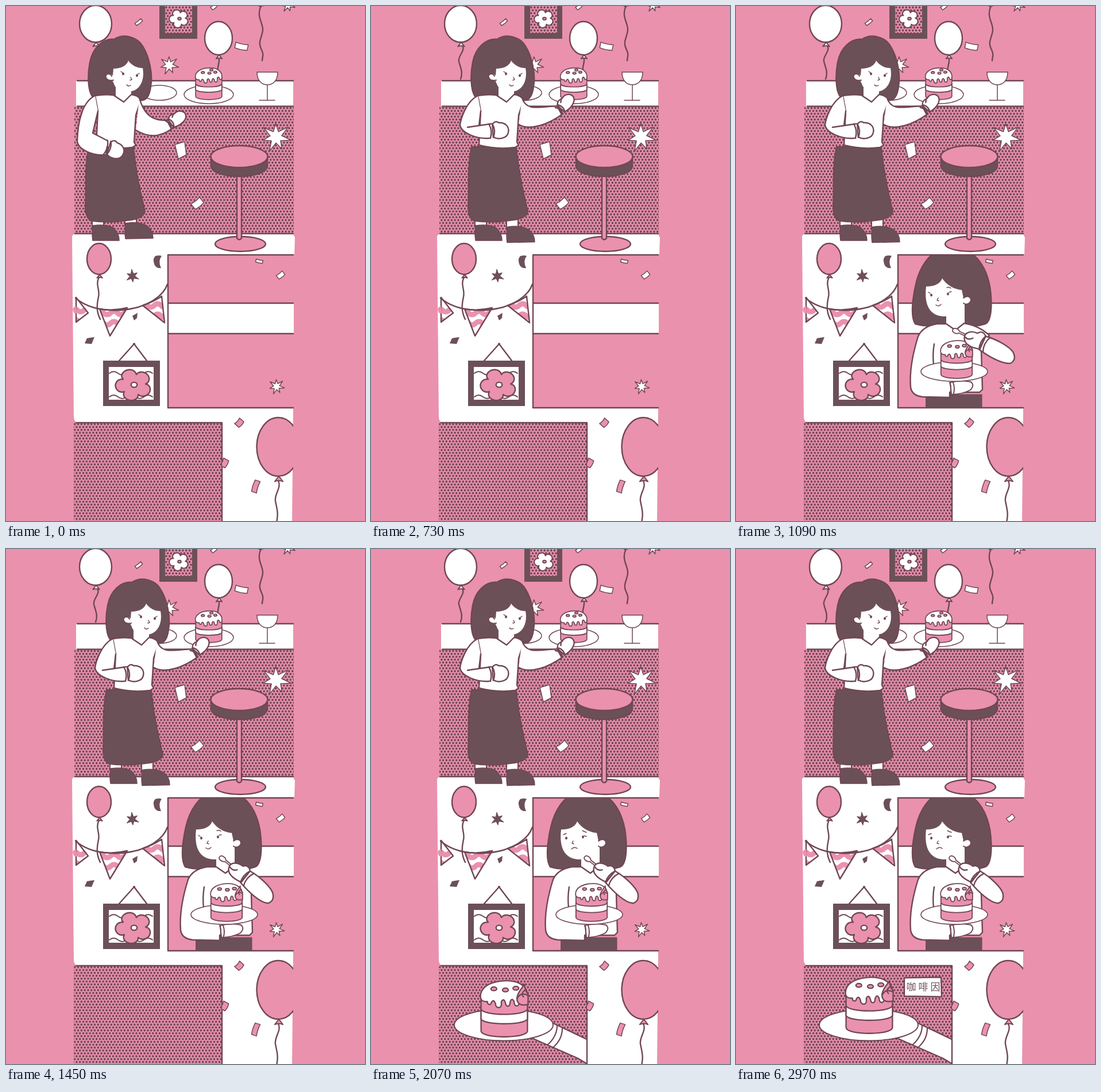
These frames come from a looping animation (625x896 px, 3.08 s). An HTML page:

```html
<!DOCTYPE html>
<html lang="zh">
<head>
<meta charset="utf-8">
<title>Party comic</title>
<style>
  html, body { margin: 0; width: 100%; height: 100%; overflow: hidden; background: #ea91ae; }
  svg { display: block; width: 100%; height: 100%; }
  path, ellipse, rect { stroke-linecap: round; stroke-linejoin: round; vector-effect: non-scaling-stroke; }
  text { font: 500 17px "Noto Sans CJK SC", "Noto Sans CJK", sans-serif; text-anchor: middle; fill: #6c5058; }
</style>
</head>
<body>
<svg id="stage" viewBox="0 0 625 896"></svg>
<script>
const PINK = '#ea91ae', DARK = '#6c5058', LINE = '#704655', WHITE = '#fff', DOTS = 'url(#dots)';
const LOOP = 3080;

const path = (d, fill = 'none', w = 2.4, extra = '') =>
  `<path d="${d}" fill="${fill}" stroke="${LINE}" stroke-width="${w}" ${extra}/>`;
const flat = (d, fill, extra = '') => `<path d="${d}" fill="${fill}" ${extra}/>`;
const oval = (x, y, rx, ry, fill, w = 2.4) =>
  `<ellipse cx="${x}" cy="${y}" rx="${rx}" ry="${ry}" fill="${fill}" stroke="${LINE}" stroke-width="${w}"/>`;
const box = (x, y, w, h, fill) => `<rect x="${x}" y="${y}" width="${w}" height="${h}" fill="${fill}"/>`;
const group = (id, body) => `<g id="${id}">${body}</g>`;
const eye = (x, y) => oval(x, y, 1.5, 2.1, LINE, 1);

const polar = (x, y, count, radius, squash = 1) => 'M' + Array.from({ length: count }, (_, i) => {
  const a = i / count * 2 * Math.PI, r = radius(a, i);
  return `${(x + r * Math.cos(a)).toFixed(1)} ${(y + r * squash * Math.sin(a)).toFixed(1)}`;
}).join('L') + 'z';
const star = (x, y, r, points, fill, w = 1.6, turn = 0) =>
  path(polar(x, y, points * 2, (a, i) => i % 2 ? r * .38 : r * (i % 4 ? .86 : 1)), fill, w,
    `transform="rotate(${turn} ${x} ${y})"`);
const flower = (x, y, r, fill, w, squash) =>
  path(polar(x, y, 80, a => r * (.62 + .4 * Math.sqrt(Math.abs(Math.sin(2.5 * a + .22)))), squash), fill, w) +
  oval(x + 1, y, r * .17, r * .14, fill === WHITE ? PINK : WHITE, w);
const ribbon = (x, y, w, h, turn, fill) =>
  path(`M${-w / 2} ${-h / 2}Q0 ${-h * .3} ${w / 2} ${-h / 2}V${h / 2}Q0 ${h * .7} ${-w / 2} ${h / 2}z`,
    fill, 1.5, `transform="translate(${x} ${y}) rotate(${turn})"`);
const balloon = (x, y, rx, ry, fill, string) => {
  const b = y + ry, k = rx * .15 + 1.5;
  return path(string) + oval(x, y, rx, ry, fill) +
    path(`M${x + 1} ${b}l${-k} ${k * 1.3}q${k} ${-k * .4} ${k * 2} 0z`, fill, 2);
};
const wave = (x, y, step, n) => `M${x} ${y}q${step / 2} -6 ${step} 0` + `t${step} 0`.repeat(n);

// Cake around its bottom centre; 80 units wide.
const cake = (x, y, scale, w, bitten) => `<g transform="translate(${x} ${y}) scale(${scale})">` +
  path('M-40 -68V-10C-38 3 38 3 40 -10V-68z', PINK, w) +
  path('M-40 -48C-36 -36 36 -36 40 -48V-31C36 -20 -36 -20 -40 -31z', WHITE, w) +
  path(`M-41 -70C-41 -88 -19 -97 4 -97C28 -97 41 -85 40 -69C40 -59 33 -59 32 -67Q29 -72 26 -66V-59
    C25 -51 17 -52 17 -61Q13 -69 10 -60C10 -51 3 -51 2 -59Q-1 -68 -5 -61V-55C-7 -48 -15 -50 -15 -57
    Q-18 -66 -22 -60C-23 -54 -29 -55 -29 -61Q-41 -60 -41 -70z`, WHITE, w) +
  [[-18, -83], [2, -81], [20, -84], [8, -91]].slice(0, bitten ? 3 : 4)
    .map(([bx, by]) => oval(bx, by, 5, 3.2, PINK, w)).join('') +
  (bitten ? path('M35 -91C31 -84 24 -79 22 -68C21 -57 29 -53 41 -56V-74Q35 -80 35 -91z', PINK, w) +
    path('M35 -80Q28 -75 33 -69M22 -66Q28 -78 40 -72', 'none', w) : '') + '</g>';

const flag = (id, d, x, y) => `<clipPath id="${id}"><path d="${d}"/></clipPath>` + flat(d, WHITE) +
  `<g clip-path="url(#${id})" fill="none" stroke="${PINK}" stroke-width="9">` +
  [0, 18].map(dy => `<path d="${wave(x, y + dy, 12, 5)}"/>`).join('') + '</g>' + path(d);

const wall =
  balloon(156, 31, 28, 32, WHITE, 'M158 67C166 78 151 86 153 96S161 115 156 127') +
  balloon(370, 56, 24, 29, WHITE, 'M370 88C374 97 367 104 369 114') +
  path('M444 0C435 18 448 30 447 42S438 62 444 74S446 88 446 95') + path('M438 -2l4 3 7 -2', WHITE, 2) +
  box(267, 0, 66, 57, DARK) + box(277, 0, 47, 47, DOTS) + flower(301, 22, 16.5, WHITE, 2, .95) +
  ribbon(231, 28, 13, 5, -38, WHITE) + ribbon(410, 70, 22, 10, 12, WHITE) + ribbon(362, 1, 11, 6, -40, WHITE) +
  star(491, -2, 13, 7, WHITE, 1.5, 20) + star(284, 103, 17, 7, WHITE, 1.5, 12) +
  box(122, 130, 378, 45, WHITE) + box(119, 175, 382, 221, DOTS) +
  path('M124 130H500M124 174.5H500') +
  oval(267, 151, 30, 13, WHITE, 1.5) + oval(353, 154, 43, 16, WHITE, 1.5) + cake(353, 163, .57, 1.7, false) +
  path('M437 115H473C473 131 464 137 455 137S437 131 437 115zM455 137V164M441 164H468', WHITE, 1.5) +
  star(470, 228, 27, 7, WHITE, 1.5, 12) +
  path('M294 241L311 236 314 259 300 266z', WHITE, 1.5) + ribbon(333, 343, 19, 12, -38, WHITE);

const floor =
  flat('M119 397H500L503 403 502 432H283V699H500L498 896H376V725H124Q118 723 118 714L115 402Q115 398 119 397z', WHITE) +
  path('M120 396H500') +
  oval(408, 414, 44, 13, PINK) + path('M402 290V404Q406 409 410 404V290z', PINK) +
  path('M357 262V280C362 302 450 302 455 280V262z', DARK) + oval(406, 262, 49.5, 19, PINK);

const leftRoom =
  flag('flagA', 'M122 507L143 534 122 550z', 112, 529) + flat('M122 522Q114 525 117 531 119 537 124 534z', PINK) +
  flag('flagB', 'M163 527L181 574 211 525Q187 531 163 527z', 158, 534) +
  flag('flagC', 'M238 521L276 551 271 505Q256 515 238 521z', 234, 521) +
  path('M121 508C148 531 192 534 230 524Q272 510 281 484') +
  balloon(162, 440, 21, 27, PINK, 'M162 472C155 485 164 493 161 506S157 531 164 545') +
  flat('M260 435Q267 433 271 435Q264 443 270 456Q261 457 258 449Q255 439 260 435z', DARK) +
  star(220, 470, 12, 6, DARK, 1, 25) +
  flat('M220 539L229 534 228 543 223 547z', DARK) + flat('M141 578L154 576 149 588 137 587z', DARK) +
  path('M197 617L223 588 245 617') + oval(223, 588, 1.6, 1.6, LINE, 1) +
  box(169, 617, 99, 79, DARK) + box(179, 628, 78, 57, WHITE) +
  path(wave(180, 639, 15, 4) + wave(180, 680, 15, 4), 'none', 2) +
  flower(222, 659, 31, PINK, 2.4, .87);

const rightRoom = box(282, 433, 218, 266, PINK) + box(282, 517, 219, 53, WHITE) +
  path('M282 517H500M282 570H500');
const rightConfetti = ribbon(441, 444, 12, 5, 12, WHITE) + ribbon(478, 468, 13, 8, -38, WHITE) +
  star(471, 662, 14, 7, WHITE, 1.5, 10);

const corner = `<g clip-path="url(#cornerClip)">` +
  balloon(474, 767, 37.5, 51, PINK, 'M474 826C480 838 467 849 469 861S475 882 471 898') +
  ribbon(406, 725, 13, 10, -48, PINK) + ribbon(380, 795, 14, 10, -62, PINK) + ribbon(435, 836, 21, 9, 108, PINK) + '</g>';

const guestBody =
  path('M150 368V385H170V368z', WHITE, 2) +
  path('M151 382Q174 379 187 386Q197 395 197 408H151Q149 394 151 382z', DARK, 1.5) +
  group('foot', path('M207 362V382H227V362z', WHITE, 2) +
    path('M208 378Q232 374 246 383Q256 391 256 404L208 405Q206 391 208 378z', DARK, 1.5)) +
  path('M144 245H222C226 290 234 325 242 357Q241 368 220 372Q180 378 149 374Q139 370 138 352C140 314 136 280 144 245z', DARK, 2) +
  path(`M150 157C142 145 142 119 146 98C151 72 170 56 188 58C205 47 229 54 238 70
    C249 88 256 117 252 140C250 156 245 165 234 164L212 152 184 157z`, DARK) +
  flat('M191 130V157L205 167 218 154V143z', WHITE) +
  flat(`M185 129C173 132 170 119 178 118Q183 118 186 121L187 109C200 109 210 104 213 95
    C219 104 229 108 238 108C242 129 233 148 214 149Q200 149 190 140z`, WHITE) +
  path('M187 129C173 132 170 119 178 118Q182 118 184 122', WHITE, 2) +
  eye(204, 118) + eye(228, 121) +
  path('M217 124l2 4 -3 1M210 137Q213 141 217 138M203 116l-3 -2M229 119l3 -2', 'none', 1.4) +
  path('M155 156Q172 153 187 155L205 167 218 154Q229 155 235 163L226 190 223 237 226 242 220 246Q188 250 157 242L160 183z', WHITE);

const guest = group('guest', guestBody + path('', WHITE, 2.4, 'id="reach"') +
  group('reachHand', path('M2 -8C6 -15 13 -14 16 -13C25 -17 35 -10 33 -2C31 7 16 10 5 8z', WHITE) +
    path('M-3 -8Q4 0 0 9M4 -8Q10 0 5 9M14 -13L10 -9')) +
  flat('', WHITE, 'id="sleeve"') + path('', 'none', 2.4, 'id="sleeveLines"') +
  group('foldHand', path('M3 -11Q9 -18 14 -13C26 -13 32 -5 30 4C28 16 11 17 3 11z', WHITE) +
    path('M-3 -12Q3 0 -2 13M3 -12Q9 0 3 12')));

const taster =
  path('M331 676H428V702H331z', DARK, 1) +
  path(`M312 553C303 540 308 506 313 484C320 453 337 431 353 426H403C425 438 437 462 442 488
    C446 514 446 548 434 553Q414 560 397 552L366 553Q335 560 312 553z`, DARK) +
  flat('M366 530V553L382 564 398 553V515z', WHITE) +
  flat(`M331 488C345 488 355 484 359 474C368 487 381 493 393 494Q395 503 396 508
    C406 501 412 510 407 516Q401 521 395 517C390 532 375 541 360 540C338 538 327 521 331 488z`, WHITE) +
  path('M396 508C406 501 412 510 407 516Q401 521 396 517', WHITE, 2) +
  path(`M350 553Q325 557 317 575C307 607 302 638 304 663Q306 678 325 680L372 681V672H424L429 667
    427 600 441 573Q423 556 397 552L382 564 366 553z`, WHITE) +
  path('M345 588Q342 606 344 624') +
  path('M373 655Q392 650 409 654Q416 660 408 668Q396 675 375 676z', WHITE, 2) +
  path('M372 655Q376 666 372 680M378 655Q382 666 378 677', 'none', 2) +
  oval(380, 636, 58, 17, WHITE, 1.6) + cake(384, 648, .68, 1.8, true) +
  eye(340, 503) + eye(369, 501) +
  path('M352 508l-2 4 3 1', 'none', 1.4) +
  group('smile', path('M348 520Q353 524 357 519M338 500l-3 -2M371 498l4 -1M367 490q4 -2 7 1', 'none', 1.4)) +
  group('frown', path('M349 522Q354 517 359 521M335 497l5 -2M368 490l7 3M371 499l4 1', 'none', 1.4)) +
  group('spoonArm',
    path('M-4 -13C18 -16 42 -13 51 -7Q62 2 55 12C44 20 15 17 -4 13z', WHITE) +
    path('M-34 -2H-49C-52 -6 -61 -5 -61 0S-52 5 -49 1H-34z', WHITE, 1.8) +
    path('M-4 -13C-10 -19 -16 -17 -19 -12C-32 -12 -40 -4 -37 4C-33 16 -18 15 -5 12z', WHITE) +
    path('M-4 -13Q-10 0 -5 13M4 -14Q-3 0 3 14M-36 3Q-28 6 -23 -1'));

const serving =
  path('M278 850L317 825 380 855V898L360 886z', WHITE) +
  path('M324 829Q324 848 307 863M333 834Q333 854 316 868', 'none', 2.2) +
  oval(231, 828, 86, 27.5, WHITE, 2) + group('servedCake', cake(232, 849, 1.01, 2.3, true));

const label = group('label', path('M293 746L357 745 358 779 293 778z', WHITE)) +
  [...'咖啡因'].map((c, i) => `<text id="char${i}" x="${305 + 21 * i}" y="768">${c}</text>`).join('');

const clip = (id, x, y, w, h) => `<clipPath id="${id}">${box(x, y, w, h, WHITE)}</clipPath>`;
document.getElementById('stage').innerHTML = `<defs>
  <pattern id="dots" width="5.78" height="10" patternUnits="userSpaceOnUse">
    <rect width="5.78" height="10" fill="${PINK}"/>
    <path d="M1.445 2.5h0M4.335 7.5h0" stroke="${LINE}" stroke-width="4" stroke-linecap="round"/>
  </pattern>` + clip('roomClip', 282, 433, 218, 266) + clip('serveClip', 118, 725, 258, 171) +
  clip('cornerClip', 376, 701, 124, 195) + '</defs>' +
  box(0, 0, 625, 896, PINK) + wall + floor + leftRoom + rightRoom +
  `<g clip-path="url(#roomClip)">${group('taster', taster)}</g>` + rightConfetti +
  path('M500 433H282V699H500') + box(118, 725, 258, 171, DOTS) +
  `<g clip-path="url(#serveClip)">${group('serving', serving)}</g>` + label +
  path('M122 725H376V898') + corner + guest;

const ticks = [0, 110, 200, 290, 390, 470, 570, 650, 730, 830, 910, 1010, 1090, 1190, 1290, 1370, 1450, 1550,
  1630, 1710, 1810, 1890, 1990, 2070, 2170, 2250, 2350, 2450, 2530, 2610, 2710, 2790, 2870, 2970];
const tracks = {
  walk: [[0, 0, 0], [200, 8, 4], [390, 22, 5], [570, 29, -3], [730, 31, 0]],
  foot: [[0, 0, 0], [390, -4, 1], [730, -2, 6.5]],
  reach: [[0, 284, 206, -25, 216], [390, 295, 190, -33, 206], [730, 297, 181, -38, 206]],
  fold: [[0, 176, 246, 18, 151, 221, 151], [390, 183, 229, 2, 153, 217, 153], [730, 178, 217, -4, 137, 211, 157]],
  taster: [[830, 180], [910, 80], [1010, 20], [1090, 0]],
  spoon: [[1090, 433, 588, 24], [1450, 420, 573, 38]],
  serving: [[1810, 170, 60], [1890, 80, 28], [1990, 20, 7], [2070, 0, 0]],
  cake: [[2070, 0], [2350, -6]],
};

// Linear value between the two neighbouring steps of a track.
function at(name, t) {
  const track = tracks[name], next = track.findIndex(s => s[0] > t);
  if (next === 0) return track[0].slice(1);
  if (next < 0) return track.at(-1).slice(1);
  const a = track[next - 1], b = track[next], k = (t - a[0]) / (b[0] - a[0]);
  return a.slice(1).map((v, i) => v + (b[i + 1] - v) * k);
}
const el = id => document.getElementById(id);
const move = (id, x, y, turn = 0) => el(id).setAttribute('transform', `translate(${x} ${y}) rotate(${turn})`);
const show = (id, on) => el(id).setAttribute('visibility', on ? 'visible' : 'hidden');
const shape = (id, d) => el(id).setAttribute('d', d);

function pose(t) {
  move('guest', ...at('walk', t));
  move('foot', ...at('foot', t));
  const [rx, ry, rTurn, under] = at('reach', t);
  shape('reach', `M232 160C239 184 ${rx - 34} ${ry - 6} ${rx - 4} ${ry - 7}L${rx + 4} ${ry + 8}
    C${rx - 18} ${ry + 24} 246 ${under + 12} 226 ${under}`);
  move('reachHand', rx, ry, rTurn);

  // Folded arm: outer edge, upper forearm edge, and the body line that meets the forearm.
  const [fx, fy, fTurn, ex, ey, bodyX] = at('fold', t);
  const bodyY = ey + (fy - 12 - ey) * (bodyX - ex) / (fx - ex);
  const outer = `L${fx - 3} ${fy + 13}C${fx - 24} ${fy + 15} 126 ${fy + 4} 124 ${fy - 10}C125 198 134 166 155 156`;
  const cuffTop = `${fx} ${fy - 12}`;
  shape('sleeve', `M160 183L${bodyX} ${bodyY}L${cuffTop}${outer}z`);
  shape('sleeveLines', `M160 183L${bodyX} ${bodyY}M${ex} ${ey}L${cuffTop}M${fx - 3} ${fy + 13}${outer}`);
  move('foldHand', fx, fy, fTurn);

  show('taster', t >= 830);
  move('taster', 0, ...at('taster', t));
  move('spoonArm', ...at('spoon', t));
  el('smile').style.display = t < 1710 ? '' : 'none';
  el('frown').style.display = t < 1710 ? 'none' : '';

  show('serving', t >= 1810);
  move('serving', ...at('serving', t));
  move('servedCake', 0, ...at('cake', t));
  show('label', t >= 2450);
  [2610, 2790, 2970].forEach((start, i) => show('char' + i, t >= start));
}

const start = performance.now();
let shown = -1;
function frame() {
  const t = Math.max(0, performance.now() - start) % LOOP;
  const tick = ticks.findLast(s => s <= t);
  if (tick !== shown) pose(shown = tick);
  requestAnimationFrame(frame);
}
frame();
</script>
</body>
</html>
```
